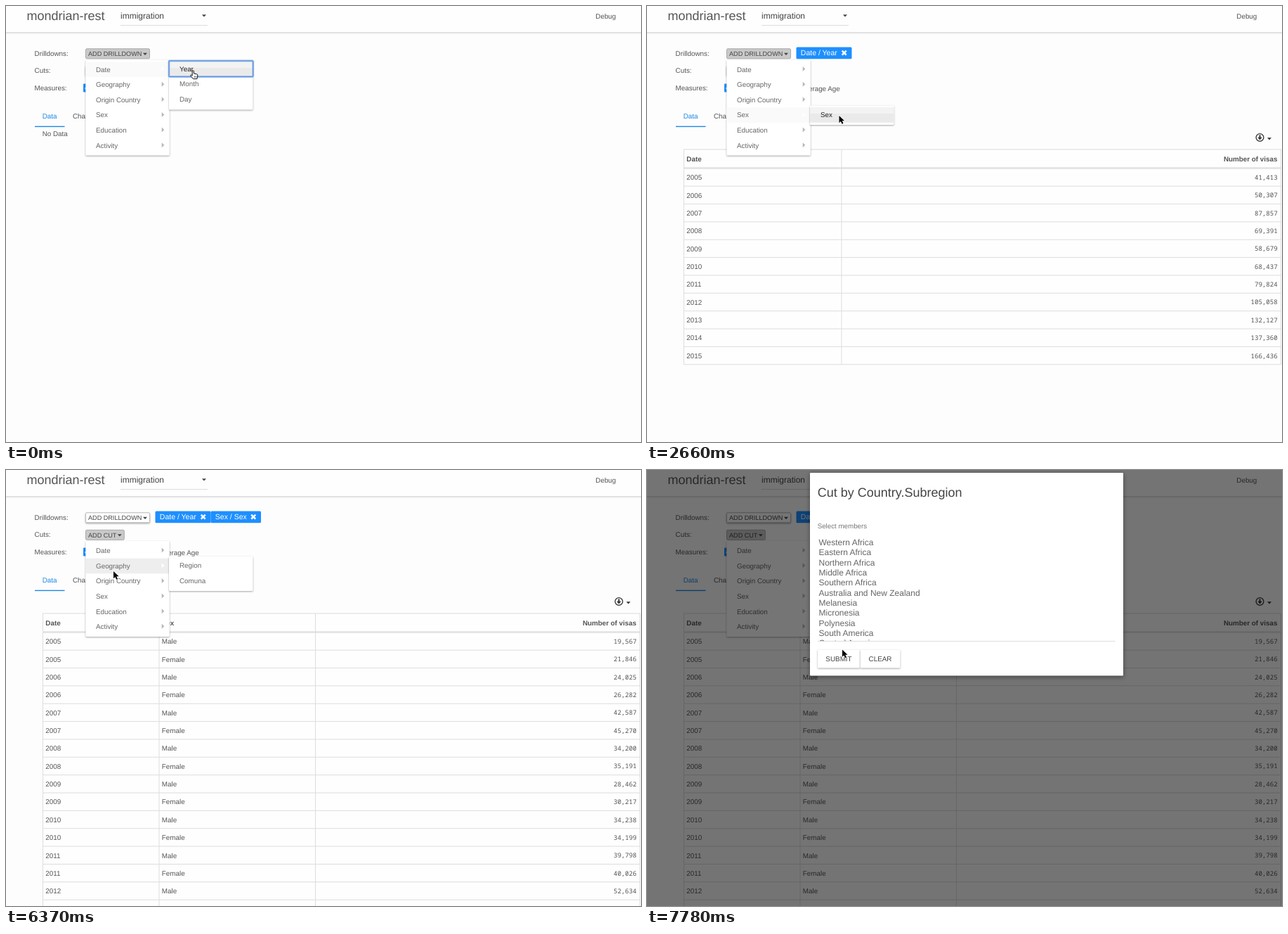
Animation of 904 by 620 pixels, one loop 7990 ms. Source, as an HTML page:

```html
<!DOCTYPE html>
<html lang="en">
<head>
<meta charset="utf-8">
<title>mondrian-rest</title>
<style>
html, body { margin: 0; width: 100%; height: 100%; overflow: hidden; background: #fdfdfd; }
svg { display: block; width: 904px; height: 620px; }
text { font-family: "Liberation Sans", Arial, sans-serif; text-rendering: geometricPrecision; white-space: pre; }
.mono { font-family: "Noto Sans Mono", monospace; }
.tick { font-family: "DejaVu Sans", sans-serif; }
.bold { font-weight: bold; }
.card { filter: drop-shadow(0 1px 1px rgba(0,0,0,.35)); }
.modal { filter: drop-shadow(0 2px 3px rgba(0,0,0,.4)); }
</style>
</head>
<body>
<svg id="stage" viewBox="0 0 904 620"></svg>
<script>
const LOOP = 7990, DRILL = 90, CUT = 114.6, ROW = 21.65, BLUE = '#1e8fff';
const dims = ['Date', 'Geography', 'Origin Country', 'Sex', 'Education', 'Activity'];
const levels = [['Year', 'Month', 'Day'], ['Region', 'Comuna'], ['Region', 'Subregion', 'Country'], ['Sex']];
const totals = [41413, 50307, 87857, 69391, 58679, 68437, 79824, 105058, 132127, 137360, 166436];
const males = [19567, 24025, 42587, 34200, 28462, 34238, 39798, 52634];
const regions = ['Western Africa', 'Eastern Africa', 'Northern Africa', 'Middle Africa', 'Southern Africa',
  'Australia and New Zealand', 'Melanesia', 'Micronesia', 'Polynesia', 'South America', 'Central America'];

// [start, end, steps, cursor x, cursor y, state changes at start]
const script = [
  [0, 0, 1, 262, 91, {hand: 1, menu: DRILL, sub: 0, focus: 1, check: 0, tags: 0, table: 0, modal: 0}],
  [120, 120, 1, 262, 91, {check: 1, tags: 1}],
  [330, 330, 1, 262, 91, {table: 1}],
  [630, 630, 1, 200, 89],
  [750, 750, 1, 145, 84, {sub: -1, focus: 0, check: 0}],
  [990, 990, 1, 144, 85],
  [1108, 1227, 2, 146, 100, {hand: 0, sub: 0}],
  [1345, 1345, 1, 144, 112, {sub: 1}],
  [1463, 1582, 2, 138, 136, {sub: 2}],
  [1700, 1700, 1, 131, 150, {sub: 3}],
  [1820, 2060, 3, 273.5, 156],
  [2780, 2780, 1, 273.5, 156, {focus: 1, check: 1, tags: 2}],
  [2900, 2900, 1, 273.5, 156, {table: 2}],
  [4070, 4070, 1, 270, 157, {hand: 1}],
  [4310, 4550, 3, 298, 155, {hand: 0}],
  [4790, 4908, 2, 405, 190],
  [5026, 5026, 1, 408, 198, {menu: 0, sub: -1, focus: 0, check: 0}],
  [5144, 5380, 3, 180, 94],
  [5770, 5770, 1, 122, 88, {hand: 1}],
  [6010, 6010, 1, 122, 88, {menu: CUT}],
  [6128, 6128, 1, 130, 108, {hand: 0, sub: 0}],
  [6246, 6370, 2, 153, 144, {sub: 1}],
  [6490, 6720, 3, 157, 156, {sub: 2}],
  [6840, 7540, 7, 268, 178],
  [7660, 7660, 1, 268, 178, {modal: 1}],
  [7780, 7780, 1, 278, 255.5, {modal: 2, sub: -1}]
];

function stateAt(t) {
  const s = {x: 0, y: 0};
  for (const [start, end, n, x, y, change] of script) {
    if (t < start) break;
    const done = n > 1 ? Math.min(n, 1 + Math.floor((t - start) / (end - start) * (n - 1) + 1e-6)) : 1;
    s.x += (x - s.x) * done / n;
    s.y += (y - s.y) * done / n;
    Object.assign(s, change);
  }
  return s;
}

const text = (x, mid, str, size = 9.85, fill = '#555', attrs = '') =>
  `<text x="${x}" y="${mid + size * .36}" font-size="${size}" fill="${fill}" ${attrs}>${str}</text>`;
const rect = (x, y, w, h, fill, attrs = '') =>
  `<rect x="${x}" y="${y}" width="${w}" height="${h}" fill="${fill}" ${attrs}/>`;
const path = (d, fill, attrs = '') => `<path d="${d}" fill="${fill}" ${attrs}/>`;
const caret = (x, y, fill = '#444') => path(`M${x} ${y}h6l-3 3.2z`, fill);
const range = (n, fn) => Array.from({length: n}, (_, i) => fn(i)).join('');

function button(y, w, label, pressed) {
  return rect(113.5, y, w, 14, pressed ? '#c9c9c9' : '#fff',
      `rx="1.5" stroke="${pressed ? '#a9a9a9' : '#bbb'}" ${pressed ? '' : 'class="card"'}`)
    + text(117, y + 7, label, 9.1, '#444') + caret(113.5 + w - 9.5, y + 6);
}

function tag(x, w, label) {
  const cx = x + w - 10.8;
  return rect(x, 58.5, w, 16.8, BLUE, 'rx="1.5"') + text(x + 6.3, 66.5, label, 10.5, '#fff')
    + path(`M${cx - 3} 63.7l6 6m0 -6l-6 6`, 'none', 'stroke="#fff" stroke-width="2.5"');
}

function header() {
  return rect(0, 0, 904, 38, '#fefefe') + rect(0, 37.5, 904, 1, '#c2c2c2') + rect(0, 38.5, 904, 1, '#eee')
    + text(29.5, 13.3, 'mondrian-rest', 18) + text(163, 13.3, 'immigration', 12, '#444')
    + rect(163, 27, 124, 1, '#ddd') + caret(279, 12.3) + text(839.3, 14, 'Debug');
}

function controls(s) {
  return text(40.6, 67, 'Drilldowns:') + text(40.6, 91.5, 'Cuts:') + text(40.6, 116.3, 'Measures:')
    + button(60.8, 91, 'ADD DRILLDOWN', s.menu === DRILL) + button(85.3, 54.8, 'ADD CUT', s.menu === CUT)
    + (s.tags > 0 ? tag(212.5, 79, 'Date / Year') : '') + (s.tags > 1 ? tag(291.5, 71.5, 'Sex / Sex') : '')
    + rect(110, 110.5, 12, 12, BLUE, 'rx="1"') + path('M112.5 116.5l2.5 2.5l4.5 -5', 'none', 'stroke="#fff" stroke-width="1.5"')
    + text(125.5, 117, 'Number of visas')
    + rect(203.5, 111, 11, 11, '#fff', 'rx="1" stroke="#777"') + text(218.6, 117, 'Average Age')
    + text(51.7, 156.5, 'Data', 9.85, '#1e88e5') + text(95, 156.5, 'Chart') + rect(41, 170.7, 42.5, 1.4, '#1e88e5');
}

function table(kind) {
  const split = kind === 2, pitch = 25.36, top = 231, n = split ? 16 : totals.length;
  const bottom = top + n * pitch, line = '#ddd';
  const vline = x => rect(x, 204, 1, bottom - 204, line);
  const right = 'text-anchor="end"';
  let out = rect(52, 204, 850.5, bottom - 204, '#fefefe')
    + rect(52, 203.5, 850.5, 1, line) + rect(52, 229.3, 850.5, 2.5, '#e2e2e2')
    + (split ? [52, 217.5, 440, 902] : [52, 276.5, 902]).map(vline).join('')
    + text(56.3, 217, 'Date', 9.85, '#555', 'class="bold"')
    + (split ? text(221.8, 217, 'Sex', 9.85, '#555', 'class="bold"') : '')
    + text(897.5, 217, 'Number of visas', 9.85, '#555', 'class="bold" ' + right);
  out += range(n, i => {
    const year = split ? i >> 1 : i, female = i % 2, y = top + 12.7 + i * pitch;
    const value = !split ? totals[year] : female ? totals[year] - males[year] : males[year];
    return text(56.3, y, 2005 + year) + (split ? text(221.8, y, female ? 'Female' : 'Male') : '')
      + text(897.7, y, value.toLocaleString('en-US'), 9.1, '#555', 'class="mono" ' + right)
      + rect(52, top + (i + 1) * pitch - .7, 850.5, 1, line);
  });
  return out + '<circle cx="872.5" cy="187" r="5.4" fill="none" stroke="#333" stroke-width="1.3"/>'
    + path('M871.5 183.5h2v3.3h2.3l-3.3 3.6l-3.3 -3.6h2.3z', '#333') + caret(883, 187.2, '#333');
}

const card = (x, mid, n) => rect(x, mid - 13.5, 119.5, n * ROW + 6, '#fff', 'rx="1.5" class="card"');

function menu(s) {
  const inSub = s.x >= 232;
  let out = card(113.3, s.menu, dims.length);
  out += dims.map((name, i) => {
    const y = s.menu + i * ROW, open = i === s.sub;
    return (open ? rect(113.3, y - 10.6, 119.5, ROW, inSub ? '#fafafa' : '#eee') : '')
      + text(128, y, name, 9.85, '#666')
      + path(`M221.7 ${y - 4}l3.6 3.5l-3.6 3.5z`, open ? '#fff' : '#b8b8b8');
  }).join('');
  return s.sub < 0 ? out : out + submenu(s, inSub);
}

function submenu(s, inSub) {
  const list = levels[s.sub], mid = s.menu + s.sub * ROW;
  const hover = inSub && s.x < 352 ? Math.floor((s.y - mid + 10.8) / ROW) : -1;
  return card(232, mid, list.length) + list.map((name, i) => {
    const y = mid + i * ROW, on = i === hover, focused = s.focus && !i, checked = s.check && !i;
    const plain = focused && checked;
    return (on ? rect(232, y - 11, 119.5, ROW, plain ? '#f8f8f8' : '#f3f3f3')
        + (plain ? '' : rect(232, y - 2, 119.5, ROW - 9, '#eaeaea')) : '')
      + (focused ? rect(232, y - 12, 119.7, 22.6, 'none', 'stroke="#aecbf2" stroke-width="3" rx="1"')
        + rect(232, y - 12, 119.7, 22.6, 'none', 'stroke="#6598dc" stroke-width="1.5" rx="1"') : '')
      + (checked ? text(246.5, y - .7, '✓', 9.5, '#222', 'class="tick"') : '')
      + text(checked ? 257 : 247, y - .7, name, 9.85, on || focused ? '#222' : '#666');
  }).join('');
}

function modal(phase) {
  const raised = (x, w, label) => rect(x, 255.5, w, 26, '#fff', 'rx="1" class="card"')
    + text(x + w / 2, 268.3, label, 9.9, '#444', 'text-anchor="middle"');
  const box = rect(232, 4, 446, 288.5, '#fff', 'rx="1" class="modal"')
    + text(242.7, 31.3, 'Cut by Country.Subregion', 18, '#444')
    + text(242.7, 79.5, 'Select members', 9.75, '#777')
    + regions.map((name, i) => text(244.5, 102.7 + i * 14.33, name, 12, '#666')).join('')
    + rect(240, 243.5, 428, 11, '#fff') + rect(243, 243, 423.5, 1, '#ddd')
    + raised(243, 60, 'SUBMIT') + raised(303.5, 57, 'CLEAR');
  const veil = alpha => rect(0, 0, 904, 620, '#000', `opacity="${alpha}"`);
  return phase === 1 ? `<g transform="translate(0 -34.5)" opacity=".45">${box}</g>` + veil(.21) : veil(.54) + box;
}

function cursor(s) {
  const shape = s.hand
    ? path('M3.2 8V1.8a1.1 1.1 0 0 1 2.2 0V5l4 .8q1.7 .4 1.4 2.2l-.8 4.6H4.4L.8 8.2q-.4 -1.2 .8 -1.2z', '#fff', 'stroke="#111" stroke-linejoin="round"')
      + path('M6.3 8.4v2.6m2 -2.6v2.6', 'none', 'stroke="#111" stroke-width=".7"')
    : path('M0 0V10.2L2.4 8L4.1 11.8L6 11L4.3 7.3H7.6Z', '#000', 'stroke="#fff" stroke-width="1.2" paint-order="stroke"');
  return `<g transform="translate(${s.x} ${s.y})">${shape}</g>`;
}

const stage = document.getElementById('stage');
let last = '';

function frame(now) {
  const s = stateAt(now % LOOP), key = JSON.stringify(s);
  if (key !== last) {
    last = key;
    stage.innerHTML = header() + controls(s)
      + (s.table ? table(s.table) : s.tags ? '' : text(51.7, 181, 'No Data'))
      + (s.menu ? menu(s) : '') + (s.modal ? modal(s.modal) : '') + cursor(s);
  }
  requestAnimationFrame(frame);
}
frame(0);
</script>
</body>
</html>
```
